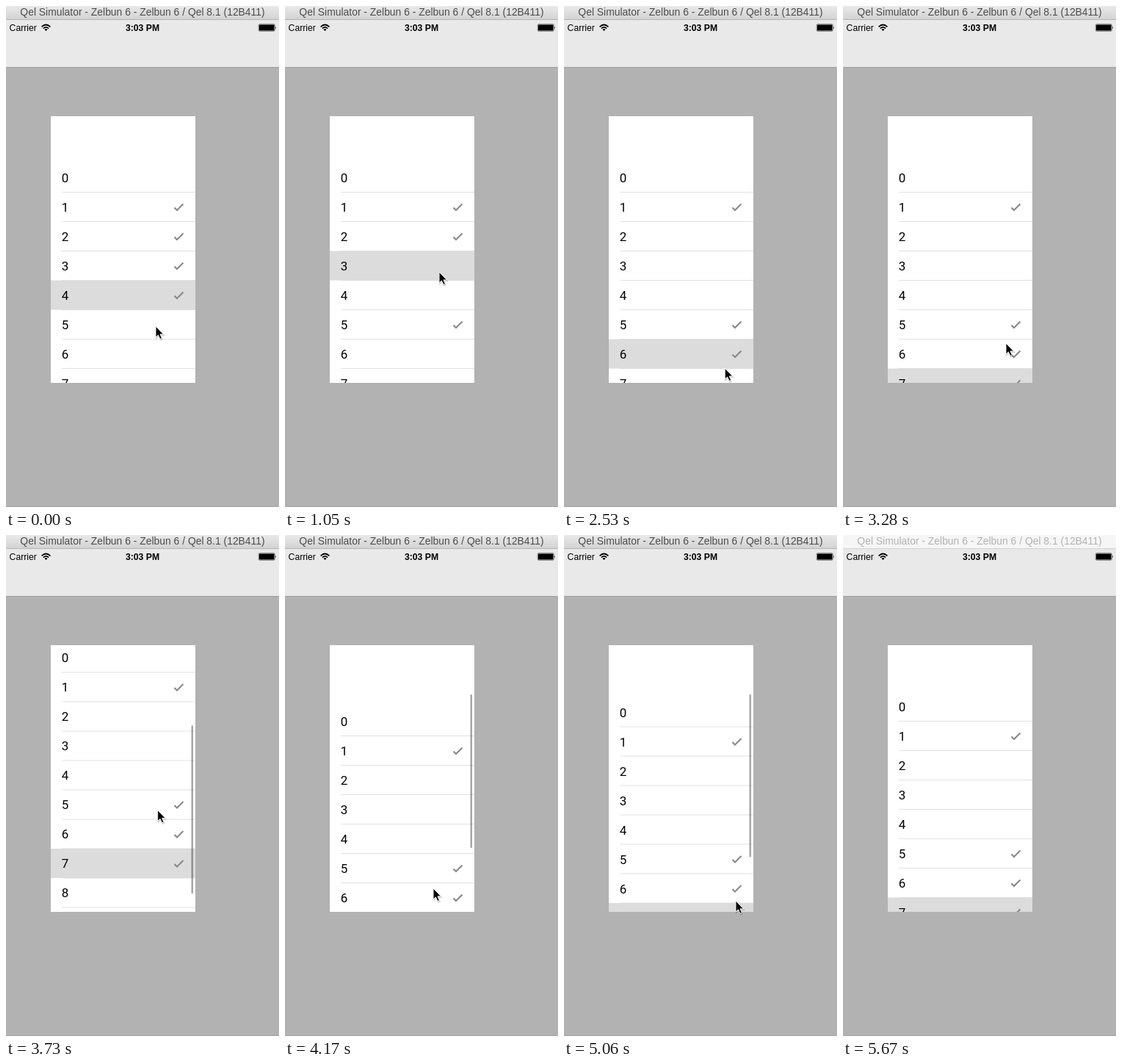
Animation, 372 px wide and 682 px high, one loop 5700 ms. Source, as an HTML page:

```html
<!DOCTYPE html>
<html lang="en">
<head>
<meta charset="utf-8">
<title>Multiple selection list</title>
<style>
html, body { margin: 0; width: 100%; height: 100%; overflow: hidden; background: #b2b2b2; }
svg { display: block; width: 372px; height: 682px; }
text { font-family: "Liberation Sans", Arial, sans-serif; }
#list text { font: 17px Roboto, Arial, sans-serif; }
</style>
</head>
<body>
<svg viewBox="0 0 372 682">
  <defs>
    <linearGradient id="bar" x2="0" y2="1">
      <stop stop-color="#e9e9e9"/><stop offset="1" stop-color="#d3d3d3"/>
    </linearGradient>
    <clipPath id="panel"><rect x="61" y="150" width="197" height="363"/></clipPath>
    <path id="arrow" d="M0 0V15L3.4 11.9L5.9 17.4L8.5 16.3L6 10.9H10.6Z"/>
  </defs>
  <rect width="372" height="682" fill="#b2b2b2"/>
  <rect y="681" width="372" height="1" fill="#a3a3a3"/>
  <rect id="title" width="372" height="18"/>
  <rect id="edge" y="18" width="372" height="1"/>
  <text id="caption" x="186" y="13" font-size="13.9" text-anchor="middle">Qel Simulator - Zelbun 6 - Zelbun 6 / Qel 8.1 (12B411)</text>
  <rect y="19" width="372" height="64" fill="#e9e9e9"/>
  <rect y="83" width="372" height="1" fill="#9f9f9f"/>
  <text x="4.6" y="34" font-size="12.2">Carrier</text>
  <g fill="none" stroke="#000" stroke-width="1.7">
    <path d="M48.6 28.3Q54.5 22.7 60.4 28.3M50.9 30.6Q54.5 27.2 58.1 30.6"/>
    <path d="M54.5 34L52.5 32Q54.5 30.2 56.5 32Z" fill="#000" stroke="none"/>
  </g>
  <text x="186" y="34" font-size="12.2" font-weight="bold" text-anchor="middle">3:03 PM</text>
  <rect x="344.25" y="24.75" width="22" height="9.5" rx="1.4" fill="none" stroke="#000" stroke-width=".5"/>
  <rect x="345" y="25.5" width="20.5" height="8" rx=".8"/>
  <path d="M367 27.8q1.6 1.7 0 3.4z"/>
  <g clip-path="url(#panel)">
    <rect x="61" y="150" width="197" height="363" fill="#fff"/>
    <g id="list"></g>
    <rect id="thumb" x="252.5" width="2.5" rx="1.25" fill-opacity=".35"/>
  </g>
  <g id="cursor">
    <use href="#arrow" x=".6" y="1.4" stroke="#000" stroke-width="1.5" opacity=".18"/>
    <use href="#arrow" stroke="#fff" stroke-linejoin="round"/>
  </g>
</svg>
<script>
const $ = id => document.getElementById(id);
const LOOP = 5700, IDLE = 5670, TICK = 148.6;
const ROWS = 10, ROW_H = 40, TOP = 214;
const GRAB = 22, RELEASE = 33, GRAB_Y = 441;

// Pointer rests: tick, x, y
const path = [
  [0, 204, 436], [2, 204, 436], [7, 210, 362], [9, 208, 323],
  [13, 212, 484], [18, 220, 494], [22, 222, 459], [26, 204, 360],
  [28, 202, 481], [31, 218, 379], [34, 234, 498], [37, 354, 668]
];
// Tapped row by tick
const taps = { 2: 5, 4: 4, 6: 3, 9: 2, 14: 6, 18: 7 };

const rows = Array.from({ length: ROWS }, (_, i) => {
  const y = TOP + i * ROW_H;
  $("list").insertAdjacentHTML("beforeend",
    `<g><rect x="76" y="${y + 39}" width="182" height="1" fill="#e1e1e1"/>
     <rect x="61" y="${y - 0.5}" width="197" height="40" fill="#dcdcdc"/>
     <text x="75.8" y="${y + 26}">${i}</text>
     <path d="M229.5 ${y + 20.5}l3.5 3.5l8.5 -8.5" fill="none" stroke="#888" stroke-width="2.1"/></g>`);
  const [, glow, , check] = $("list").lastElementChild.children;
  return { glow, check };
});

const show = (el, on) => el.setAttribute("visibility", on ? "inherit" : "hidden");
const ease = u => (1 - Math.cos(Math.PI * u)) / 2;

function pointer(n) {
  const k = Math.max(1, path.findIndex(p => p[0] >= n));
  const [t0, x0, y0] = path[k - 1], [t1, x1, y1] = path[k];
  const u = ease((n - t0) / (t1 - t0));
  return [x0 + (x1 - x0) * u, y0 + (y1 - y0) * u];
}

// The list follows the drag, resists past its top, and springs back on release.
function scroll(n, y) {
  if (n <= GRAB) return 0;
  const pull = y - GRAB_Y;
  const settle = Math.exp(-Math.max(0, n - RELEASE) * 4 / 3);
  return (pull > 0 ? pull / 2 : pull) * settle;
}

function draw(n, idle) {
  const [x, y] = pointer(n);
  const off = idle ? 0 : scroll(n, y);
  const checked = new Set([1, 2, 3, 4]);
  let active = 4;
  for (const at in taps) {
    if (at > n) break;
    active = taps[at];
    if (!checked.delete(active)) checked.add(active);
  }
  rows.forEach((r, i) => {
    show(r.glow, i === active);
    show(r.check, checked.has(i));
  });
  $("list").setAttribute("transform", `translate(0 ${off})`);

  // Pulling down shrinks the thumb, scrolling up slides it.
  show($("thumb"), n > GRAB && !idle);
  $("thumb").setAttribute("y", 217 + Math.max(0, -off) * 0.634);
  $("thumb").setAttribute("height", 229 - Math.max(0, off));

  show($("cursor"), !idle);
  $("cursor").setAttribute("transform", `translate(${x} ${y})`);
  $("title").setAttribute("fill", idle ? "#f6f6f6" : "url(#bar)");
  $("edge").setAttribute("fill", idle ? "#d2d2d2" : "#b4b4b4");
  $("caption").setAttribute("fill", idle ? "#b2b2b2" : "#4c4c4c");
}

const start = performance.now();
function frame(now) {
  const t = Math.max(0, now - start) % LOOP;
  draw(Math.min(37, Math.floor(t / TICK)), t >= IDLE);
  requestAnimationFrame(frame);
}
frame(start);
</script>
</body>
</html>
```
